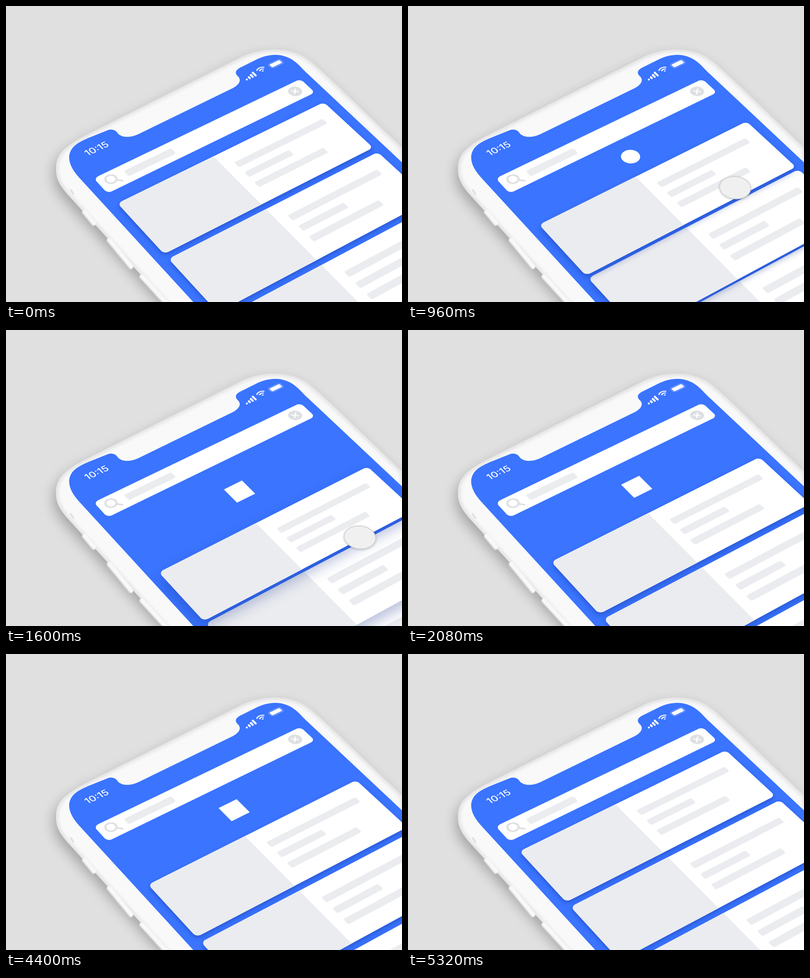
These frames come from a looping animation (800 px wide and 600 px high, 6400 ms). An HTML page with a canvas:

```html
<!DOCTYPE html>
<html lang="en">
<head>
<meta charset="utf-8">
<title>Pull to refresh</title>
<style>
html, body { margin: 0; width: 100%; height: 100%; overflow: hidden; background: #e0e0e0; }
canvas { display: block; }
</style>
</head>
<body>
<canvas id="stage" width="800" height="600"></canvas>
<script>
const ctx = document.getElementById('stage').getContext('2d');
const LOOP = 6400, PITCH = 118, CARD_W = 343, CARD_H = 108;
const BLUE = '#3a74ff', GREY = '#ebecf0', ICON = '#dfe0e3';

// Perspective of the screen plane
const A = [1.31487, -0.56706, 0.00015656];
const B = [0.79492, 0.83136, -0.0002378];
const C = [225.5, 400];
function project(u, v) {
  const w = 1 + A[2] * u + B[2] * v;
  return [(A[0] * u + B[0] * v + C[0]) / w, (A[1] * u + B[1] * v + C[1]) / w];
}

const body = new Path2D('M336 615 L130 388 C108 364 101 350 101 330 C101 301 116 285 165 260 L480 101 C520 84 572 83 607 106 C626 119 660 152 800 287 L830 640 Z');
const glass = new Path2D('M392 615 L147 347 C128 326 121 304 135 287 C146 274 168 267 205 252 C213 249 221 251 225 257 C232 267 250 268 267 260 L455 168 C472 160 476 150 469 143 C462 137 462 130 475 124 L505 109 C532 95 562 95 584 113 C593 120 600 129 610 138 L800 317 L830 640 Z');

const clamp = x => Math.max(0, Math.min(1, x));
const span = (t, from, to) => clamp((t - from) / (to - from));
const sine = p => (1 - Math.cos(Math.PI * p)) / 2;
const cubic = p => p < .5 ? 4 * p ** 3 : 1 - (2 - 2 * p) ** 3 / 2;

function trace(points) {
  ctx.beginPath();
  points.forEach(([x, y]) => ctx.lineTo(x, y));
  ctx.closePath();
}

function roundRect(x, y, w, h, r, map = project) {
  const points = [];
  for (let i = 0; i < 4; i++) {
    const cx = i === 0 || i === 3 ? x + r : x + w - r;
    const cy = i < 2 ? y + r : y + h - r;
    for (let j = 0; j <= 8; j++) {
      const a = Math.PI * (1 + i / 2 + j / 16);
      points.push(map(cx + r * Math.cos(a), cy + r * Math.sin(a)));
    }
  }
  trace(points);
}

function fill(color) {
  ctx.fillStyle = color;
  ctx.fill();
}

function shadow(color, blur = 0, x = 0, y = 0) {
  ctx.shadowColor = color;
  ctx.shadowBlur = blur;
  ctx.shadowOffsetX = x;
  ctx.shadowOffsetY = y;
}

function line(x1, y1, x2, y2, width, color) {
  ctx.lineCap = 'round';
  ctx.lineWidth = width;
  ctx.strokeStyle = color;
  ctx.beginPath();
  ctx.moveTo(x1, y1);
  ctx.lineTo(x2, y2);
  ctx.stroke();
}

// Draws in flat units around a stage point, lying in the screen plane
function lying(x, y, draw) {
  const w = 1.01 + x * .00012;
  ctx.save();
  ctx.transform((A[0] - x * A[2]) / w, (A[1] - y * A[2]) / w,
    (B[0] - x * B[2]) / w, (B[1] - y * B[2]) / w, x, y);
  draw();
  ctx.restore();
}

function circle(r, from = 0, to = 7) {
  ctx.beginPath();
  ctx.arc(0, 0, r, from, to);
}

function phone() {
  ctx.fillStyle = '#e0e0e0';
  ctx.fillRect(0, 0, 800, 600);
  ctx.save();
  shadow('rgba(0,0,0,.28)', 26, -4, 12);
  ctx.fillStyle = '#f9f9f9';
  ctx.fill(body);
  ctx.restore();

  ctx.save();
  ctx.clip(body);
  ctx.filter = 'blur(3px)';
  ctx.strokeStyle = '#e2e2e2';
  ctx.lineWidth = 9;
  ctx.stroke(body);
  ctx.restore();

  line(131, 373, 136, 381, 4, '#e2e2e2');
  for (const [x1, y1, x2, y2] of [[158, 418, 177, 441], [208, 475, 252, 529], [274, 549, 326, 606]]) {
    line(x1, y1, x2, y2, 10, '#d9d9d9');
    line(x1 + 1, y1 - 1, x2 + 1, y2 - 1, 8, '#f8f8f8');
  }
  ctx.fillStyle = BLUE;
  ctx.fill(glass);
}

function statusBar() {
  lying(183, 289, () => {
    ctx.font = '500 15px Inter, Roboto, sans-serif';
    ctx.textAlign = 'center';
    ctx.textBaseline = 'alphabetic';
    ctx.fillStyle = '#fff';
    ctx.fillText('10:15', 0, 5.4);
  });
  for (let i = 0; i < 4; i++)
    line(486.5 + 6 * i, 149 - 2.7 * i, 486.5 + 4 * i, 149 - 4.6 * i, 4, '#fff');
  lying(520, 133, () => {
    ctx.lineCap = 'butt';
    ctx.strokeStyle = '#fff';
    ctx.lineWidth = 2;
    for (const r of [1.5, 5.5, 9.3]) {
      circle(r, -Math.PI * .75, -Math.PI * .25);
      ctx.stroke();
    }
  });
  lying(545, 117, () => {
    ctx.beginPath();
    ctx.roundRect(-10.5, -5, 21, 10, 3);
    ctx.strokeStyle = 'rgba(255,255,255,.4)';
    ctx.lineWidth = 1;
    ctx.stroke();
    ctx.beginPath();
    ctx.roundRect(-9, -3.5, 18, 7, 1.5);
    fill('#fff');
  });
}

function searchBar() {
  roundRect(-1, -56, 346, 33.5, 7);
  fill('#fff');
  roundRect(39.5, -45, 77, 12, 2.5);
  fill(GREY);
  lying(212, 351, () => {
    circle(7.7);
    ctx.lineWidth = 3;
    ctx.strokeStyle = ICON;
    ctx.stroke();
    line(6, 6, 11.3, 11.3, 3, ICON);
  });
  lying(584, 173, () => {
    circle(10);
    fill(ICON);
    line(-3.4, -3.4, 3.4, 3.4, 2, '#fff');
    line(-3.4, 3.4, 3.4, -3.4, 2, '#fff');
  });
}

function card(top, squash, lift) {
  const map = (u, v) => project(u, top + v * squash);
  const outline = () => roundRect(0, 0, CARD_W, CARD_H, 7, map);
  ctx.save();
  outline();
  shadow(`rgba(10,40,130,${.38 - .08 * lift})`, 9 + 18 * lift, 0, 4 + 10 * lift);
  fill('#fff');
  shadow('transparent');
  ctx.clip();
  trace([map(-5, -5), map(155, -5), map(155, 115), map(-5, 115)]);
  fill(GREY);
  ctx.restore();
  [150, 75, 116].forEach((w, i) => {
    roundRect(171.5, 25 + 22.5 * i, w, 11, 2.5, map);
    fill(GREY);
  });
}

function badge(s, t) {
  const half = 15 * clamp((s - .15) / .28);
  if (!half) return;
  const turn = 2 * Math.PI * (sine(span(t, 2080, 2920)) + sine(span(t, 3320, 4160)));
  const cos = Math.cos(turn), sin = Math.sin(turn);
  const mid = (s - .19) / 2 * PITCH;
  roundRect(-half, -half, 2 * half, 2 * half, half * (1 - span(s, .42, .56)),
    (x, y) => project(CARD_W / 2 + x * cos - y * sin, mid + x * sin + y * cos));
  fill('#fff');
}

function finger(s, t) {
  const shown = span(t, 40, 240) * (1 - span(t, 1640, 1800));
  if (!shown) return;
  const r = 20.5 * (1.2 - .2 * shown);
  ctx.save();
  ctx.globalAlpha = shown;
  roundRect(252 - r, (.718 + 1.127 * s) * PITCH - r, 2 * r, 2 * r, r);
  shadow('rgba(0,0,0,.3)', 5, 0, 1);
  fill('#f0f0f0');
  shadow('transparent');
  ctx.strokeStyle = '#d2d2d2';
  ctx.lineWidth = 1.5;
  ctx.stroke();
  ctx.restore();
}

const RELEASE = 1640, REST = .607;
const drag = t => .84 * sine(span(Math.min(t, RELEASE), 215, 1775));

function render(t) {
  const pulled = drag(t);
  const tension = t < RELEASE ? 1 : Math.exp(-(t - RELEASE) / 190);
  let s = t < RELEASE ? pulled : REST + (pulled - REST) * tension;
  s *= 1 - cubic(span(t, 4400, 5160));
  const strain = tension * (pulled / .81) ** 2;

  phone();
  ctx.save();
  ctx.clip(glass);
  statusBar();
  badge(s, t);
  for (let i = 3; i >= 0; i--)
    card((i + s * (1 - .145 * i * tension)) * PITCH, i ? 1 : 1 - .08 * strain, strain);
  searchBar();
  ctx.restore();
  finger(pulled, t);
}

function tick(now) {
  render(now % LOOP);
  requestAnimationFrame(tick);
}
requestAnimationFrame(tick);
</script>
</body>
</html>
```
